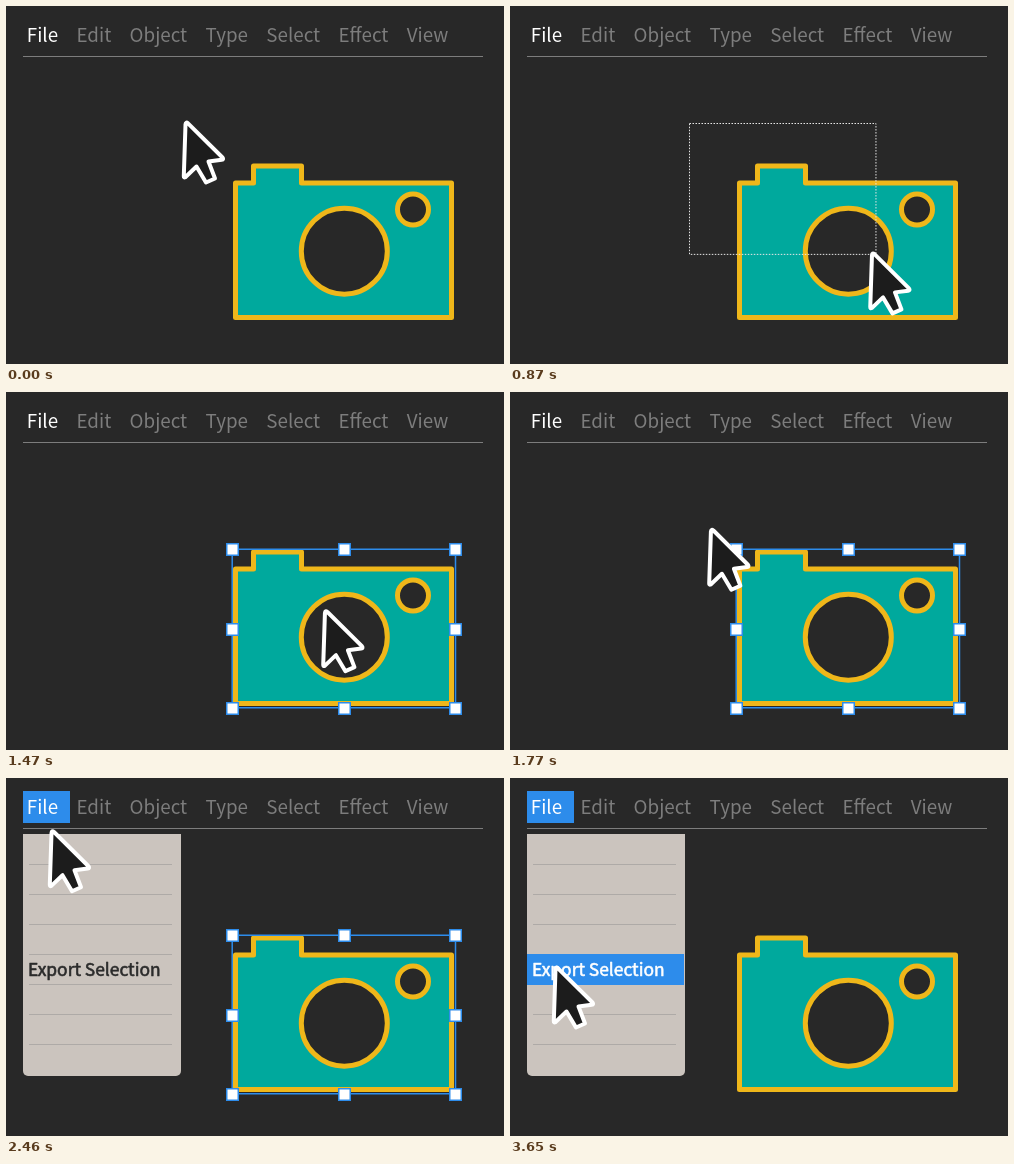
Recreate the animation shown at these times as an HTML page with a canvas. Size 498 by 358 pixels, loop 3.85 s.

```html
<!DOCTYPE html>
<html lang="en">
<head>
<meta charset="utf-8">
<title>Export Selection</title>
<style>
html, body { margin: 0; width: 100%; height: 100%; overflow: hidden; background: #282828; }
canvas { display: block; }
</style>
</head>
<body>
<canvas id="stage" width="498" height="358"></canvas>
<script>
const ctx = document.getElementById('stage').getContext('2d');
const BG = '#282828', BLUE = '#2d8ceb', TEAL = '#00a99d', GOLD = '#efb71a', GREY = '#7d7d7d';
const FONT = '"Noto Sans CJK JP", "Noto Sans CJK SC", "Noto Sans CJK", "Open Sans", sans-serif';
const MENU = ['File', 'Edit', 'Object', 'Type', 'Select', 'Effect', 'View'];
const BODY = new Path2D('M229.5 177h18v-17h48v17h150v134.5h-216z');
const POINTER = new Path2D('M179.5 118.5q.2-3 2.5-1.2L216.5 151.5q1.5 2-.8 2.3L202.5 155.5 ' +
  '209 172.5 200 176.5 190.5 160.5 179.3 171.2q-1.6.8-1.5-1.2z');

const LOOP = 3850, STEP = 30;
const PRESS = 300, RELEASE = 1110, OPEN = 2250, HOVER = 3090, DONE = 3650;

// Steady pointer moves, as offsets from its starting place
const LEGS = [
  { from: 318, to: 1035, x: 237, y: 170 },
  { from: 1222, to: 2165, x: -134, y: -86 },
  { from: 2340, to: 3180, x: -134, y: 73 }
];

function pointerAt(t) {
  let x = 0, y = 0;
  for (const leg of LEGS) {
    const k = Math.min(1, Math.max(0, (t - leg.from) / (leg.to - leg.from)));
    x += (leg.x - x) * k;
    y += (leg.y - y) * k;
  }
  return [x, y];
}

function box(x, y, w, h, color) {
  ctx.fillStyle = color;
  ctx.fillRect(x, y, w, h);
}

function text(str, x, y, size, color) {
  ctx.font = `${size}px ${FONT}`;
  ctx.fillStyle = color;
  ctx.fillText(str, x, y);
}

function outline(path, fill, stroke, width) {
  ctx.fillStyle = fill;
  ctx.strokeStyle = stroke;
  ctx.lineWidth = width;
  ctx.lineJoin = 'round';
  ctx.fill(path);
  ctx.stroke(path);
}

function ring(x, y, r) {
  const path = new Path2D();
  path.arc(x, y, r, 0, Math.PI * 2);
  outline(path, BG, GOLD, 5);
}

function drawMenuBar(open) {
  if (open) box(17, 13, 47, 32, BLUE);
  let x = 20.8;
  for (const name of MENU) {
    text(name, x, 36, 18.8, name === 'File' ? '#fff' : GREY);
    x += ctx.measureText(name).width + 18.4;
  }
  box(17, 50, 460, 1, GREY);
}

function drawPanel(hover) {
  const ink = hover ? '#fff' : '#2b2b2b', label = 'Export Selection';
  ctx.fillStyle = '#cbc4be';
  ctx.beginPath();
  ctx.roundRect(17, 56, 158, 242, [0, 0, 5, 5]);
  ctx.fill();
  for (let y = 86; y <= 266; y += 30) box(23, y, 143, 1, '#aeaaa7');
  if (hover) box(17, 176, 157, 31, BLUE);
  // A thin stroke turns the regular weight into semibold
  text(label, 22, 197.7, 17.4, ink);
  ctx.strokeStyle = ink;
  ctx.lineWidth = 0.6;
  ctx.strokeText(label, 22, 197.7);
}

function drawCamera() {
  outline(BODY, TEAL, GOLD, 5);
  ring(338.3, 245.2, 43);
  ring(407, 203.5, 15.5);
}

function drawSelection() {
  ctx.strokeStyle = BLUE;
  ctx.lineWidth = 1.5;
  ctx.strokeRect(226.2, 157.2, 223.3, 158.5);
  for (let i = 0; i < 3; i++) for (let j = 0; j < 3; j++) {
    if (i === 1 && j === 1) continue;
    const x = 220 + Math.round(i * 111.5), y = 151 + Math.round(j * 79.5);
    box(x, y, 13, 13, BLUE);
    box(x + 1.5, y + 1.5, 10, 10, '#fff');
  }
}

function drawMarquee(x, y) {
  ctx.strokeStyle = '#e6e6e6';
  ctx.lineWidth = 1;
  ctx.setLineDash([1.5, 1.5]);
  ctx.strokeRect(179.5, 117.5, x + 4, y);
  ctx.setLineDash([]);
}

function drawPointer(x, y) {
  ctx.save();
  ctx.translate(x, y);
  outline(POINTER, '#1c1c1c', '#fff', 4);
  ctx.restore();
}

function draw(now) {
  const raw = now % LOOP;
  const t = Math.floor(raw / STEP) * STEP;
  const [x, y] = pointerAt(t);
  box(0, 0, 498, 358, BG);
  drawMenuBar(t >= OPEN);
  if (t >= OPEN) drawPanel(t >= HOVER);
  drawCamera();
  if (t >= RELEASE && raw < DONE) drawSelection();
  if (t >= PRESS && t < RELEASE) drawMarquee(x, y);
  drawPointer(x, y);
}

const start = performance.now();
function tick() {
  draw(performance.now() - start);
  requestAnimationFrame(tick);
}
tick();
</script>
</body>
</html>
```
